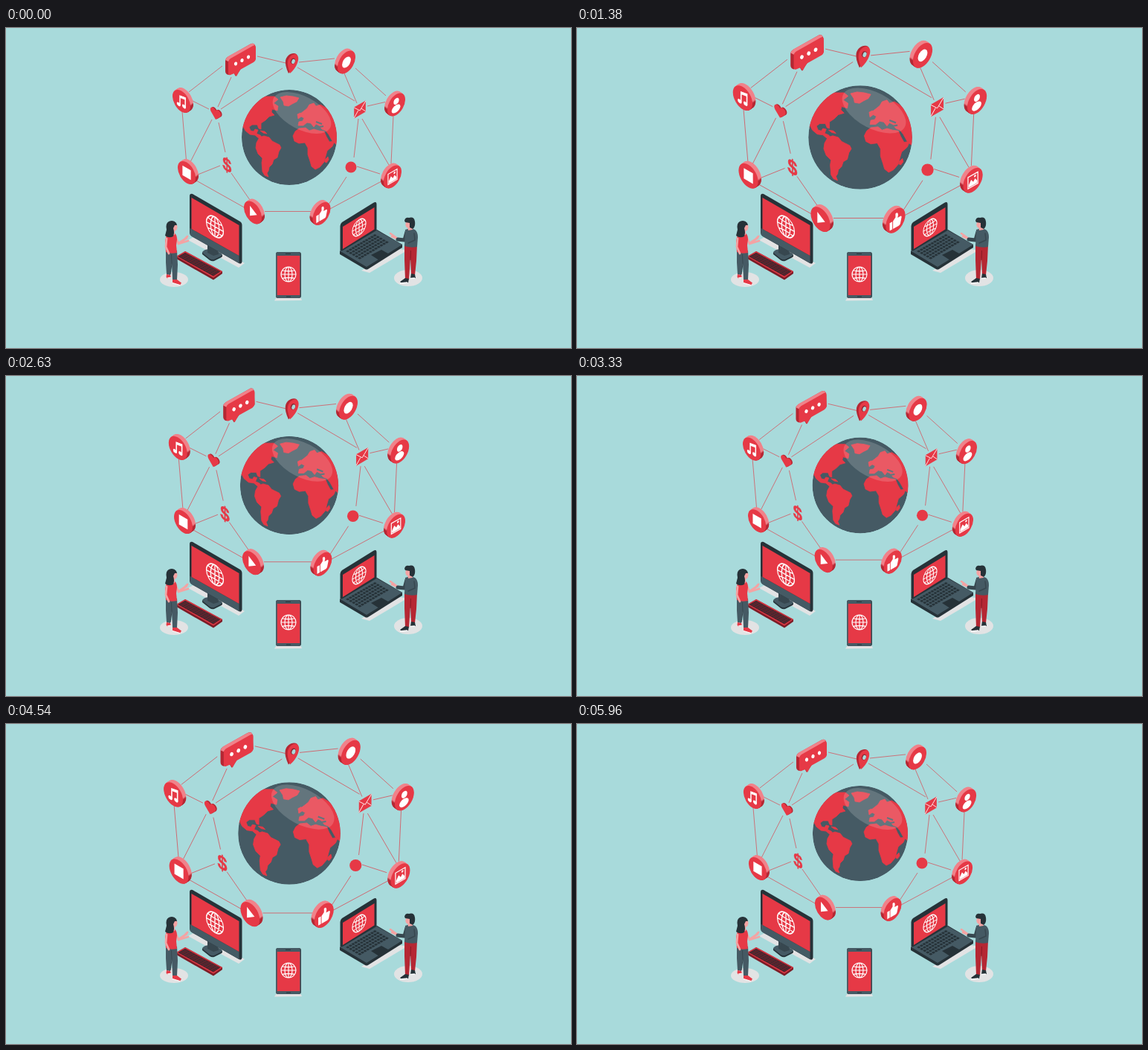
An HTML page for the animation above (6000 ms loop, 760 px wide and 430 px high).

```html
<!DOCTYPE html>
<html lang="en">
<head>
<meta charset="utf-8">
<title>Connected world</title>
<style>
html, body { margin: 0; width: 100%; height: 100%; overflow: hidden; background: #a8dadb; }
svg { display: block; width: 760px; height: 430px; }
</style>
</head>
<body>
<svg id="stage" viewBox="0 0 760 430"></svg>
<script>
const RED = '#e63946', DEEP = '#b52733', PINK = '#f0828a', SLATE = '#455a64', STEEL = '#37474f',
  INK = '#263238', SKIN = '#f4a3a3', PALE = '#e2e3e4';
const LEFT = 'matrix(.866 .5 0 1 ', RIGHT = 'matrix(.866 -.5 0 1 ';

const poly = (pts, fill, extra = '') => `<polygon points="${pts}" fill="${fill}" ${extra}/>`;
const path = (d, fill, extra = '') => `<path d="${d}" fill="${fill}" ${extra}/>`;
const line = (d, color, w, extra = '') => path(d, 'none', `stroke="${color}" stroke-width="${w}" ${extra}`);
const oval = (x, y, rx, ry, fill, extra = '') =>
  `<ellipse cx="${x}" cy="${y}" rx="${rx}" ry="${ry}" fill="${fill}" ${extra}/>`;
const put = (x, y, plane, body) => `<g transform="${plane}${x} ${y})">${body}</g>`;
const round = 'stroke-linejoin="round" stroke-linecap="round"';

// Wireframe globe shown on each screen
const wire = (x, y, r, plane) => put(x, y, plane, `<g transform="scale(${r / 10})">` +
  line('M-10 0a10 10 0 1 0 20 0a10 10 0 1 0-20 0M-5 0a5 10 0 1 0 10 0a5 10 0 1 0-10 0M0-10V10M-10 0H10M-8.4-5.3Q0-3.3 8.4-5.3M-8.4 5.3Q0 3.3 8.4 5.3',
    '#fff', 1.15) + '</g>');

// Thick isometric disc; side is 1 when the rim shows on the right
function badge(x, y, side, glyph) {
  const plane = side > 0 ? LEFT : RIGHT;
  let rim = '';
  for (let i = 8; i > 0; i--)
    rim += put(x + side * i / 2, y - i * .36, plane, '<circle r="13.9" fill="url(#rim)"/>');
  return rim + put(x, y, plane, `<circle r="13.9" fill="${RED}"/>` + glyph);
}

const glyphs = {
  music: oval(-4.3, 6, 2.9, 2.4, '#fff') + oval(4, 5, 2.9, 2.4, '#fff') +
    line('M-2.3 6V-6L6-7.5V5', '#fff', 1.7) + line('M-2.3-5L6-6.5', '#fff', 3.2),
  user: '<circle cy="-4.6" r="4.2" fill="#fff"/>' + oval(-.5, 5.3, 6.8, 5, '#fff'),
  photo: '<rect x="-7" y="-7" width="14" height="14" fill="none" stroke="#fff" stroke-width="1.3"/>' +
    poly('-6,6 -6,3 -2.5,-2 .5,2 3,-1 6,3 6,6', '#fff') + '<circle cx="3" cy="-4" r="1.4" fill="#fff"/>',
  play: poly('-4.5,-7 6.5,0 -4.5,6.5', '#fff'),
  thumb: '<rect x="-8.3" y="-1" width="3.8" height="9.5" fill="#fff"/>' +
    path('M-3.5-1L0-4V-8.5Q3.8-9.5 3.7-5L3-2H7.5Q9.2-1.2 8.4 1L6.8 7.2Q6.2 8.6 4.5 8.6H-3.5Z', '#fff'),
  dot: '<circle r="6.8" fill="#fff"/>',
  square: '<rect x="-6.5" y="-6.5" width="13" height="13" fill="#fff"/>'
};

const links = `M246 86L291 51M338 38L376 47M394 46L442 41M470 54L511 91M455 61L472 101M392 53L469 98
  M372 54L289 109M303 66L285 106M251 98L273 109M277 123L248 180M286 127L295 167M237 112L242.500 178
  M258 197L288 185M303 195L328 231M256 205L322 242M348 246.500H410M434 237L458 200M436 243L505 206
  M472 186L503 196M468 174L474 122M479 122L515 184M486 105L510 99.500M521 118L518 182`;

const lands = [
  'M316 139L317 123Q323 105 338 97L349 92 361 92 366 96 360 101 366 105 365 111 358 109 357 113 361 117 354 119 349 124 343 128 343 136 340 135 338 130 331 130 327 133 329 138 333 139 335 136 339 137 337 142 342 144 345 148 341 149 335 144 328 143 322 138 319 132Z',
  'M341 147L347 145 354 147 358 152 362 154 368 157 370 161 367 166 365 174 360 177 358 183 354 187 353 192 351 195 353 200 348 198 345 193 344 181 345 175 339 169 336 161 337 154Z',
  'M369 93L377 91 386 92 394 94 391 99 385 102 380 105 374 104 373 99Z',
  'M393 131L394 126 399 125 401 121 397 119 396 115 400 112 405 108 408 103 414 101 417 105 423 103 430 107 437 113 446 136 446 158 439 152 434 143 430 138 425 136 421 131 417 129 414 133 410 128 405 127 400 131Z',
  'M386 145L389 139 394 135 403 134 408 138 414 136 421 138 428 139 431 146 435 153 442 152 439 159 432 165 430 172 428 180 422 187 416 190 411 186 409 179 406 170 406 161 402 154 394 155 388 152Z',
  'M429 177L433 173 434 177 431 181 429 180Z',
  'M392 116l4-2 1 5-4 3z',
  'M342 138l6 1 3 3-5-1z'
];

const world = `<clipPath id="ball"><circle cx="381" cy="147" r="64"/></clipPath>
  <g clip-path="url(#ball)"><circle cx="381" cy="147" r="64" fill="${SLATE}"/>` +
  path(lands.join(''), RED, `stroke="${RED}" stroke-width=".8" stroke-linejoin="round"`) +
  line('M417 126l8 3 M421 133l6-1', SLATE, 2) +
  oval(398, 114, 43, 22, '#fff', 'opacity=".16" transform="rotate(28 398 114)"') + '</g>';

const chat = path('M295 44Q295 41 298 39L328 22Q333 19 335 23L336 42 316 55 309 65 306 60 299 63Q295 62 295 58Z', DEEP) +
  path('M295 43Q296 40 299 38L328 22Q333 19 335 23L299 45Z', PINK) +
  path('M299 46Q299 43 302 41L332 24Q336 22 336 26V41Q336 44 333 46L315 56 310 65 307 61 302 63Q299 64 299 61Z', RED) +
  [[309, 48], [317.5, 43.500], [326, 39]].map(([x, y]) => oval(x, y, 2.1, 2.6, '#fff', `transform="rotate(20 ${x} ${y})"`)).join('');

const pin = path('M380 61Q375 50 376 44C377 38 382 34 387 34C393 34 393 40 391 45Q388 54 380 61Z', DEEP) +
  path('M382 61Q378 50 379 45C380 39 385 35 389 35C394 36 394 42 392 47Q389 55 382 61Z', RED) +
  oval(386, 44.500, 3, 4, '#8d2832', 'transform="rotate(20 386 44.5)"') +
  oval(386.500, 45, 2.2, 3.2, '#a8dadb', 'transform="rotate(20 386.5 45)"');

const heart = path('M0 7L-7 0C-11-5-4-10 0-5C4-10 11-5 7 0Z', RED);
const small = put(283.500, 115.500, LEFT, heart.replace(RED, DEEP)) + put(282, 116, LEFT, heart) +
  put(297.300, 184, LEFT, `<text y="8.500" text-anchor="middle" fill="${RED}" stroke="${RED}" stroke-width=".5" font-size="25" font-weight="700" font-family="Liberation Sans, Arial, sans-serif">$</text>`) +
  put(476, 109.500, RIGHT, `<rect x="-9" y="-7.500" width="18" height="15" fill="${RED}"/>` +
    line('M-9-7L0 1.500 9-7M-9 7L-2.500 0M9 7L2.500 0', '#fff', .8)) +
  `<circle cx="464" cy="187" r="7.500" fill="${RED}"/>`;

const network = line(links, '#d6505a', .75) + world + chat + pin + small +
  badge(236, 98.500, 1, glyphs.music) + badge(243, 194.500, 1, glyphs.square) + badge(332, 248, 1, glyphs.play) +
  badge(458, 46, -1, glyphs.dot) + badge(525, 103, -1, glyphs.user) +
  badge(520, 200, -1, glyphs.photo) + badge(424.500, 249.500, -1, glyphs.thumb);

// Rows of keys on a board spanned by two edge vectors
function keys(x, y, [ax, ay], [bx, by], cols, rows, color) {
  let d = '';
  for (let r = 0; r < rows; r++) for (let c = 0; c < cols; c++) {
    const u = c / cols, v = r / rows, k = .76 / cols, m = .7 / rows;
    d += `M${x + ax * u + bx * v} ${y + ay * u + by * v}l${ax * k} ${ay * k} ${bx * m} ${by * m} ${-ax * k} ${-ay * k}z`;
  }
  return path(d, color);
}

const monitor = poly('245,285 254,280 321,316 313,322', PALE) +
  path('M264 304Q263 301 268 299L277 297 290 304Q293 307 288 309L280 313Q277 314 274 312Z', INK) +
  path('M264 302Q264 300 268 298L277 296 290 303Q292 305 288 307L280 311Q277 312 274 310Z', SLATE) +
  poly('271,290 285,297 286,304 279,306 271,302', STEEL) +
  path('M247 226Q247 222 251 223L314 259.500Q317.500 261 317.500 265V314Q317 318 313 316L250 280Q247 278 247 275Z', INK) +
  poly('247.500,269 313.500,306 313.500,316 250,280 247.500,277', SLATE) +
  poly('249.500,228 313.500,265 313.500,306 249.500,270', RED) + wire(281, 267, 13.200, LEFT);

const keyboard = poly('229,307 241,300 291,327 291,330 279,338.500 229,310', '#7d1d27') +
  poly('229,307 241,300 291,327 279,335.500', RED) + poly('231,307 241,301.500 289,327 279,333.800', '#6d222b') +
  keys(232, 307, [47, 26], [9.500, -5], 13, 4, '#3a2a31');

const phone = poly('364,362 396,362 398,366 361,366.500', PALE) +
  `<rect x="363" y="301" width="34" height="62" rx="3" fill="${STEEL}"/>
   <rect x="363" y="301" width="32.500" height="62" rx="3" fill="${SLATE}"/>
   <rect x="364.800" y="306" width="30.500" height="53" fill="${RED}"/>` +
  line('M376 303.500h7', INK, 1) + line('M377 361h6', INK, 1) + wire(380, 331, 10, 'matrix(1 0 0 1 ');

const laptop = poly('478,326 525,297 536,298 536,301 489,329', PALE) +
  path('M449 300L499 271 533 291V295L487 324Q485 325 483 324L449 304Z', INK) +
  poly('449,299.500 498,271.500 533,291 485,321', SLATE) +
  keys(457, 300, [40, -23.500], [20, 11.500], 11, 5, INK) +
  poly('491,305 505,298 515,303.500 501,311.500', INK) +
  path('M449.500 266Q449.500 263 452 261L494 235Q498.500 232 498.500 237V272L452 299.500 449.500 299Z', INK) +
  poly('453,267 495.500,241 495.500,270.500 453,297', RED) + wire(475, 268, 10.500, RIGHT);

const woman = oval(226, 338, 19, 10, PALE) +
  path('M215 300L230 299 231 318 230 338 224 338 223 316 221 332 216 331 215 315Z', SLATE) +
  line('M222.500 304L223 317 221 331', STEEL, 1) +
  path('M216 331l5 1 1 3-5 1.500-1.500-2z M224 338l6 0 6 4.500-2 3-10-3z', RED) +
  line('M217 336l5-1M224 342.500l10 3', '#fff', 1.2) +
  line('M229 283L232 289.500 243 282M232 290L245 286M241 283l3-3', SKIN, 2.8, round) +
  path('M216 278L227 276Q230 278 230 284L229 292 230 302Q222 304 215 301L214 286Z', RED) +
  line('M216 283L215 294 219 303', SKIN, 2.8, round) +
  poly('222,270 227,271 227,278 222,279', SKIN) + oval(226.500, 267.500, 4, 5.200, SKIN) +
  path('M229 262Q225 257 219 260Q214 263 216 271L214 279Q219 283 225 280Q227 275 225 269L227 265 230 265Z', INK);

const man = oval(541, 336, 19, 11, PALE) +
  path('M536 291L553 291 552 313 550 332 545 332 544 309 542 338 537 338 536 312Z', DEEP) +
  line('M544.500 299L544 312', '#871925', 1) +
  path('M537 336l5 1-1 5-9 1-2-2z M545 330l5 1 1 5-7 0z', INK) +
  line('M530 343l10-1M544 336.500l6-.500', '#fff', 1.3) +
  line('M528 284L517 276M526 283L519 280', SKIN, 2.6, round) +
  line('M539 274L536 285 527 284', STEEL, 5, round) +
  path('M537 271Q544 268 550 271Q554 274 554 281L553 294Q545 296 536 293Z', SLATE) +
  line('M549 276L550 285 541 289', STEEL, 1.4, round) +
  poly('540,266 547,266 547,271 541,272', SKIN) + oval(541.500, 264, 4.200, 5, SKIN) +
  path('M536 259Q537 254 542 255Q549 253 550 260Q551 267 547 270L543 268 543 262 537 261Z', INK);

document.getElementById('stage').innerHTML =
  `<defs><linearGradient id="rim" x1="0" y1="0" x2="0" y2="1">
    <stop offset=".42" stop-color="${PINK}"/><stop offset=".5" stop-color="${DEEP}"/></linearGradient></defs>
  <rect width="760" height="430" fill="#a8dadb"/>` +
  monitor + keyboard + laptop + phone + woman + man + `<g id="net">${network}</g>`;

// Swell of the network: time in ms, share of the full growth
const beats = [[0, 0], [630, .5], [880, .77], [1260, 1], [1920, .71], [2540, .4], [3130, .13], [3420, .06],
  [3750, .15], [3960, .33], [4380, .63], [4730, .97], [5130, .72], [5670, .2], [6000, 0]];
const last = beats.length - 1;

function slope(i) {
  if (i === 0 || i === last) return 0;
  const [a, b, c] = [beats[i - 1], beats[i], beats[i + 1]];
  if ((b[1] - a[1]) * (c[1] - b[1]) <= 0) return 0;
  return (c[1] - a[1]) / (c[0] - a[0]);
}

function swell(t) {
  const i = beats.findIndex(b => b[0] > t) - 1;
  const [t0, v0] = beats[i], [t1, v1] = beats[i + 1], h = t1 - t0, u = (t - t0) / h, w = 1 - u;
  return w * w * (1 + 2 * u) * v0 + u * w * w * h * slope(i) +
    u * u * (3 - 2 * u) * v1 - u * u * w * h * slope(i + 1);
}

const net = document.getElementById('net');
const start = performance.now();
function draw() {
  const s = 1 + .092 * swell((performance.now() - start) % 6000);
  net.setAttribute('transform', `translate(381 147) scale(${s}) translate(-381 -147)`);
  requestAnimationFrame(draw);
}
draw();
</script>
</body>
</html>
```
